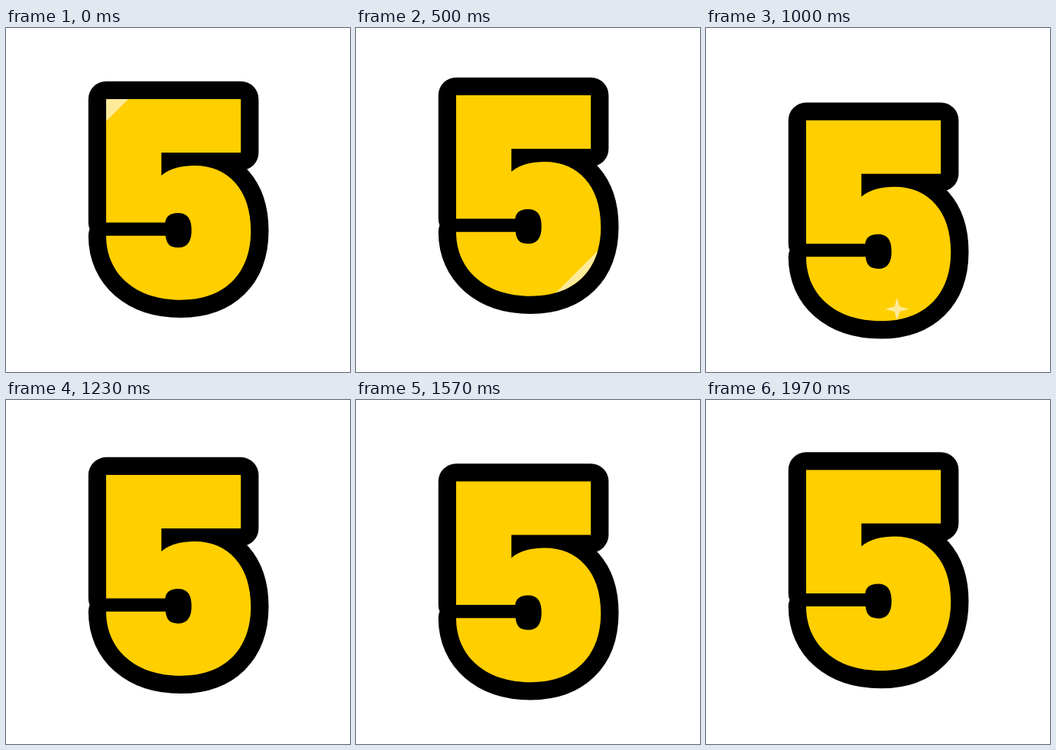
Write an HTML page with a canvas that moves like this. It is 450x450 px and loops after 2.01 s.

```html
<!DOCTYPE html>
<html>
<head>
<meta charset="utf-8">
<style>
html, body { margin: 0; height: 100%; overflow: hidden; background: #fff; }
canvas { display: block; }
</style>
</head>
<body>
<canvas id="stage" width="450" height="450"></canvas>
<script>
const ctx = document.getElementById('stage').getContext('2d');
const LOOP = 2010, YELLOW = '#ffcf00', LIGHT = '#ffea9a';

const five = new Path2D(`M131 93H307.2V163H203.3V193C215 183 231 180 246.5 180
  C291 180 320.3 212 320.3 265C320.3 322 285.5 355.7 228.5 355.7C170 355.7 131 322 131 271.7
  H208.7C210 282 214 287.3 225.3 287.3C237.5 287.3 242.7 279 242.7 264.5
  C242.7 250 237.5 242 225 242C214 242 209 247 208.3 254.5H131Z`);

// Vertical bob: [time, offset], eased with a half cosine between keys
const bob = [[0, 0], [315, 0], [685, -10], [972, 28], [1430, -10], [1675, 28], [2105, -10]];

// Shine bands, as distances behind the leading edge
const bands = [[0, 39], [57, 137], [148, 183]];

function bobAt(t) {
  const i = bob.findIndex(key => key[0] > t);
  const [t0, y0] = bob[i - 1], [t1, y1] = bob[i];
  return y0 + (y1 - y0) * (1 - Math.cos(Math.PI * (t - t0) / (t1 - t0))) / 2;
}

function drawShine(t) {
  const lead = t < 170 ? 253 : 432 + 1.56 * (t - 270);
  for (const [from, to] of bands) {
    const a = lead - from, b = lead - to;
    ctx.beginPath();
    ctx.moveTo(a, 0);
    ctx.lineTo(a - 450, 450);
    ctx.lineTo(b - 450, 450);
    ctx.lineTo(b, 0);
    ctx.fill();
  }
}

function drawSparkle(x, y, t) {
  const p = (t - 735) / 370;
  if (p <= 0 || p >= 1) return;
  const r = 20 * Math.sin(Math.PI * p);
  ctx.beginPath();
  for (let i = 0; i < 8; i++) {
    const d = i % 2 ? r * 0.3 : r, a = i * Math.PI / 4;
    ctx.lineTo(x + d * Math.cos(a), y + d * Math.sin(a));
  }
  ctx.fill();
}

function draw(now) {
  let t = now % LOOP;
  if (t > 500 && t < 570) t = 500; // short hold
  const y = bobAt(t);
  ctx.fillStyle = '#fff';
  ctx.fillRect(0, 0, 450, 450);
  ctx.save();
  ctx.translate(0, y);
  ctx.lineWidth = 46.5;
  ctx.lineJoin = 'round';
  ctx.stroke(five);
  ctx.fillStyle = YELLOW;
  ctx.fill(five);
  ctx.clip(five);
  ctx.fillStyle = LIGHT;
  drawSparkle(250, 340, t);
  ctx.translate(0, -y);
  drawShine(t);
  ctx.restore();
}

const start = performance.now();
function tick() {
  draw(performance.now() - start);
  requestAnimationFrame(tick);
}
tick();
</script>
</body>
</html>
```
